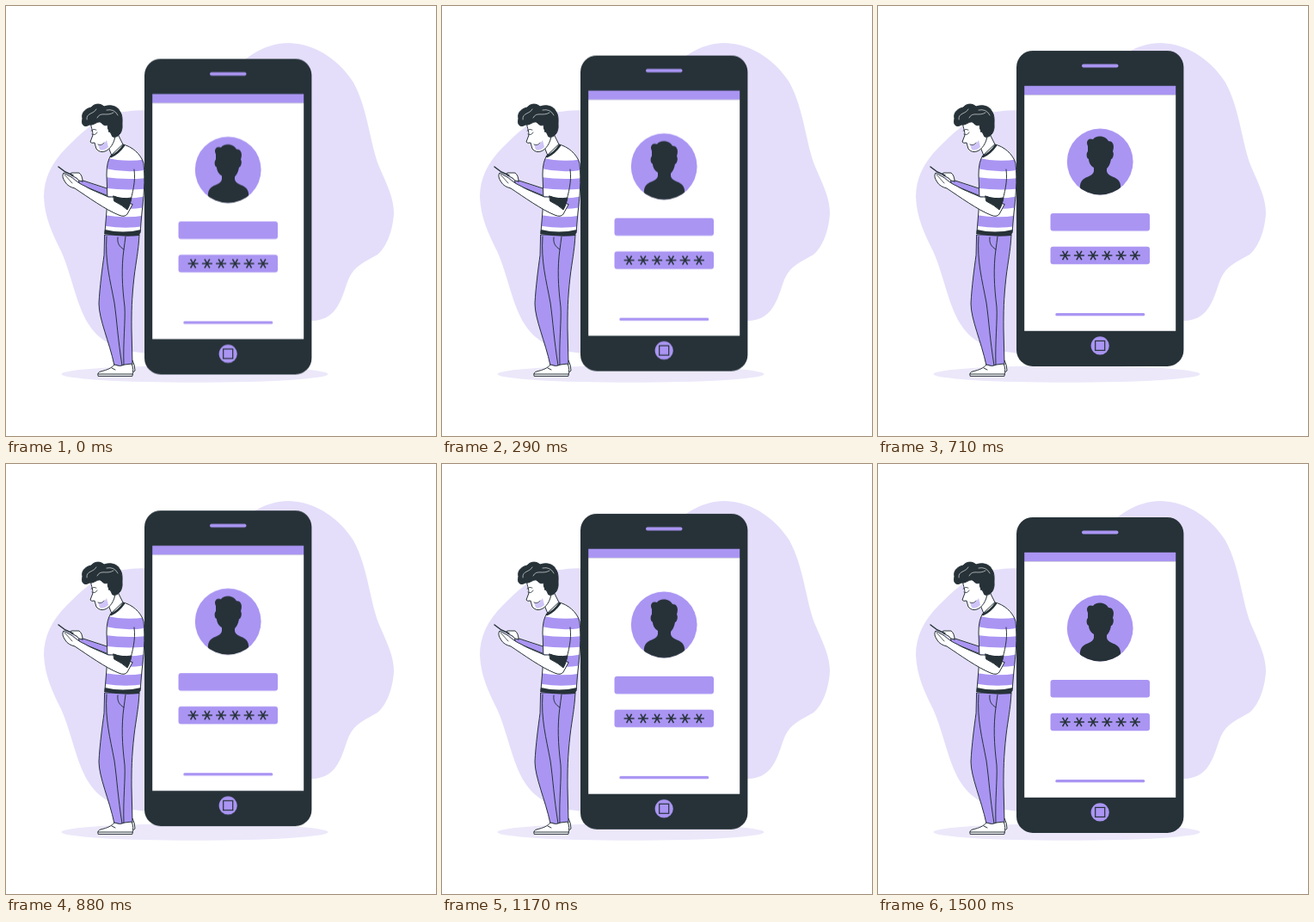
An HTML page that plays this animation: 500 px wide and 500 px high, repeating every 1540 ms.

```html
<!DOCTYPE html>
<html lang="en">
<head>
<meta charset="utf-8">
<title>Login</title>
<style>
  html, body { margin: 0; height: 100%; overflow: hidden; background: #fff; }
  svg { display: block; width: 100vw; height: 100vh; }
  .violet { fill: #aa95f3; }
  .pale { fill: #e4defa; }
  .dark { fill: #263238; }
  .white { fill: #fff; }
  .ink { stroke: #263238; stroke-width: 1; stroke-linecap: round; stroke-linejoin: round; }
  .line { fill: none; }
  .phone { animation: float 1540ms linear infinite; }
  @keyframes float {
    0% { transform: translateY(-.5px); }
    46.1% { transform: translateY(-10px); }
    97.4% { transform: translateY(0); }
    100% { transform: translateY(-.5px); }
  }
</style>
</head>
<body>
<svg viewBox="0 0 500 500">
  <defs>
    <clipPath id="disc"><circle cx="258.2" cy="191" r="38.4"/></clipPath>
    <path id="shirt" d="M136 161C146 163 157 172 160 183C162 203 160 224 158 240L156 264Q135 267 115 263L118 226L117 196Q117 180 122 174Z"/>
    <clipPath id="torso"><use href="#shirt"/></clipPath>
    <path id="star" d="M-6 0H6M-3 -5.1L3 5.1M3 -5.1L-3 5.1"/>
  </defs>

  <g class="pale">
    <path d="M250 90C275 60 300 43 329 43C362 44 389 65 404 89C421 120 423 160 434 187C444 210 451 224 451 241C450 260 443 280 432 289C416 298 405 303 399 316C391 334 388 366 355 366L250 366Z"/>
    <path d="M250 130C205 122 150 117 124 126C103 133 88 147 70 165C53 182 44 201 44 222C45 246 54 265 64 285C76 311 81 346 96 370C111 394 137 403 170 404L250 380Z"/>
  </g>
  <ellipse cx="219.5" cy="428" rx="155" ry="9.8" fill="#ece8fa"/>

  <!-- legs and shoes -->
  <g class="ink">
    <path class="white" d="M124 424C132 421 135 419 138 413L147 412Q150 418 150 424L149 425Z"/>
    <path class="violet" d="M115 266H155C154 285 151 298 149 315C146 342 146 355 146 375L147 417Q136 421 126 418C120 390 108 364 108 346C109 326 112 305 114 290Z"/>
    <path class="line" d="M117 268C115 297 121 318 126 345C129 366 130 387 135 418M130 269C129 276 132 280 137 283M139 268Q138 276 137 283C134 305 135 325 138 350C139 365 136 390 137 418"/>
    <path class="white" d="M107 430Q106 426 110 425C118 423 123 421 126 417Q133 420 138 417L146 416Q149 422 147 430Z"/>
    <path class="line" d="M107 428H147M123 421L127 423"/>
  </g>

  <!-- neck, head -->
  <g class="ink">
    <path class="white" d="M119 164L123 174Q129 171 136 161L130 149L117 152Z"/>
    <path class="white" d="M98 136C100 143 101 147 101 150L98 158Q99 160 103 159L105 166Q109 171 115 169C121 167 126 159 127 151L126 132Z"/>
    <path d="M107 161Q113 163 117 156L119 164Q114 169 109 167Z" fill="#cfc4f8" stroke="none"/>
    <path class="dark" d="M97 138C91 142 87 138 89 131C87 123 94 119 99 118C103 113 110 113 114 117C122 114 130 117 132 122C136 127 135 134 135 138C136 147 130 154 124 152C122 149 122 146 119 146L118 138C115 140 113 138 110 135C105 134 103 139 97 138Z"/>
    <path class="white" d="M119 144Q114 139 113 143Q114 147 119 147Z" stroke="none"/>
    <path class="line" d="M100 149Q104 151 106 147M99 145Q102 142 105 144M107 161Q111 163 114 159" stroke-width=".8"/>
    <path class="line" d="M94 132C93 124 102 126 105 120M106 130C110 122 117 129 125 124M117 121Q126 119 130 127" style="stroke:#fff;stroke-width:.6"/>
  </g>

  <!-- far arm -->
  <path class="violet ink" d="M119 213L119 221L92 210Q86 208 84 204L89 203Z"/>

  <!-- shirt -->
  <use href="#shirt" class="white"/>
  <g clip-path="url(#torso)" class="line" stroke="#aa95f3" stroke-width="12.5">
    <path d="M112 182Q140 189 165 184"/>
    <path d="M112 205Q140 209 165 206"/>
    <path d="M112 226Q140 233 165 227"/>
    <path d="M112 249Q140 254 165 249"/>
  </g>
  <use href="#shirt" class="ink line"/>
  <path class="dark" d="M115 260Q136 265 157 260L155 267Q135 269 114 265Z"/>
  <path class="line ink" d="M122 175Q131 171 137 162" style="stroke-width:2.6"/>
  <path class="line ink" d="M149 190C151 205 147 217 144 230" stroke-width=".8"/>

  <!-- near arm, hands, handset -->
  <g class="ink">
    <path class="white" d="M127 222L119 222C108 217 99 214 91 209C84 206 80 202 76 199L67 194Q64 198 69 205Q72 210 80 212C95 222 116 237 131 243Q138 246 141 242L147 231Z"/>
    <path class="white" d="M89 204Q89 197 85 194L76 194Q73 195 76 197L82 200Q84 204 89 204Z"/>
    <path class="dark" d="M125 221Q135 225 146 223Q144 233 141 237Q136 232 126 227Z"/>
    <path class="line" d="M61 187L69 193L78 197" style="stroke-width:1.5"/>
    <path class="line" d="M68 196L77 206" stroke-width=".8"/>
  </g>

  <g class="phone">
    <rect class="dark" x="161" y="61.9" width="194.4" height="367" rx="19"/>
    <rect class="violet" x="170.2" y="102.8" width="176" height="10.7"/>
    <rect class="white" x="170.2" y="113.3" width="176" height="274.5"/>
    <rect class="violet" x="237" y="77.5" width="42.5" height="4" rx="2"/>

    <circle class="violet" cx="258.2" cy="191" r="38.4"/>
    <path class="dark" clip-path="url(#disc)" d="M244 173C241 167 245 163 250 165C253 160 264 160 268 167C274 167 275 173 273 179C275 182 273 188 271 188C270 194 268 197 266 199L266 202C267 208 275 208 279 212Q283 216 282 224L275 232H242L235 224Q234 216 238 212C242 208 250 208 251 202V198C247 196 245 191 245 188C242 187 242 181 244 179Z"/>

    <rect class="violet" x="200.5" y="251" width="115.5" height="20.5" rx="3"/>
    <rect class="violet" x="200.5" y="289.7" width="115.5" height="20.5" rx="3"/>
    <g stroke="#263238" stroke-width="1.6">
      <use href="#star" x="217.6" y="300"/>
      <use href="#star" x="233.9" y="300"/>
      <use href="#star" x="250.1" y="300"/>
      <use href="#star" x="266.4" y="300"/>
      <use href="#star" x="282.6" y="300"/>
      <use href="#star" x="298.9" y="300"/>
    </g>
    <rect class="violet" x="206.3" y="367" width="104" height="3.3" rx="1.6"/>

    <circle class="violet" cx="258.2" cy="404.9" r="10.6"/>
    <rect class="line" x="252.7" y="399.4" width="11" height="11" stroke="#263238" stroke-width="1.2"/>
  </g>
</svg>
</body>
</html>
```
